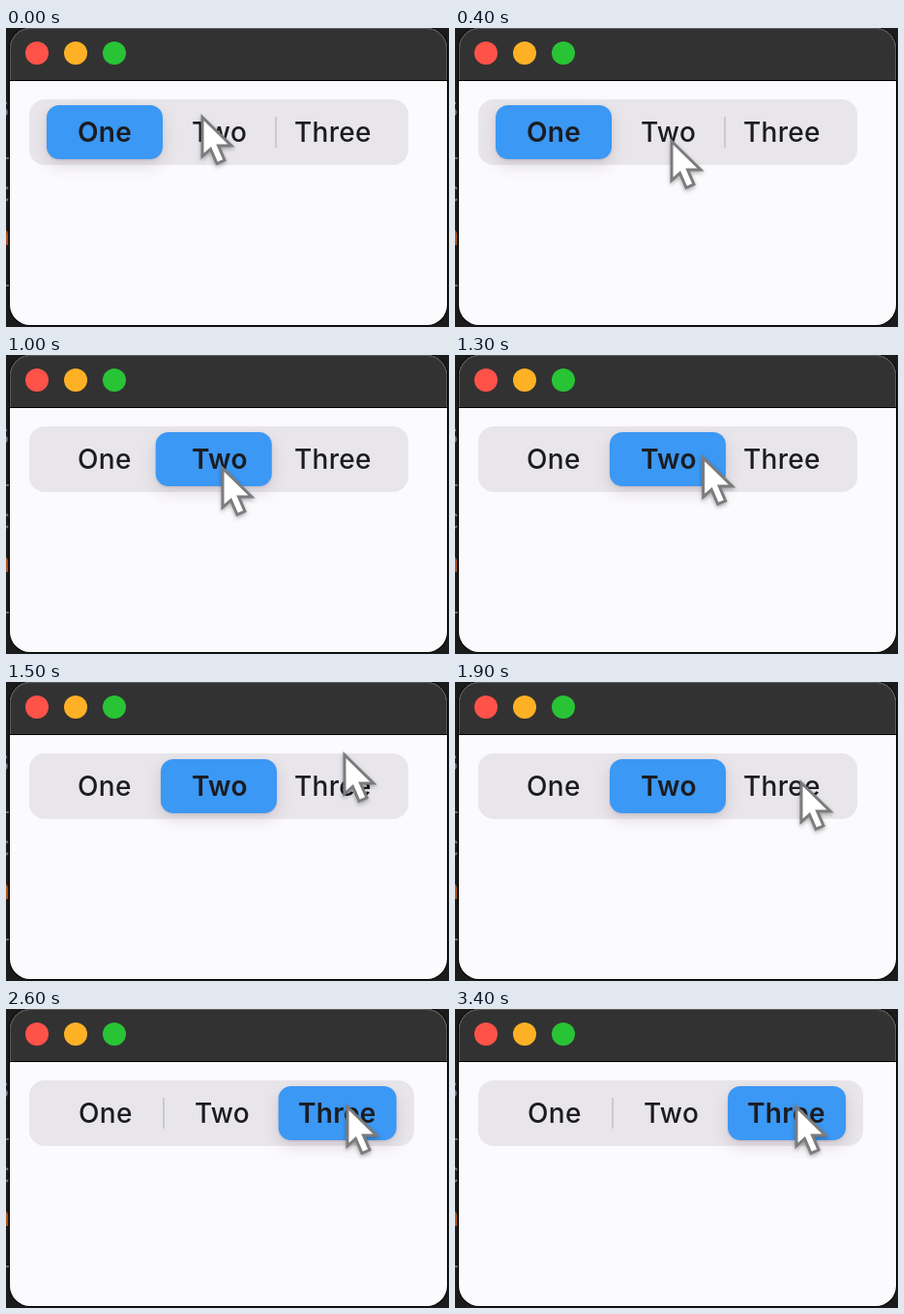
Animation of 458x310 px, one loop 3500 ms. Source, as an HTML page:

```html
<!DOCTYPE html>
<html lang="en">
<head>
<meta charset="utf-8">
<title>Segmented control</title>
<style>
  html, body { margin: 0; width: 100%; height: 100%; overflow: hidden; background: #1b1b1c; }
  svg { display: block; }
  text { font: 500 28px Inter, Roboto, sans-serif; letter-spacing: .3px; fill: #1c1c20; }
  text.on { font-weight: 600; }
  .behind text { font: 28px "DejaVu Sans Mono", monospace; text-anchor: end; fill: #77777b; }
  #pill { filter: drop-shadow(0 1px 1px rgba(40, 20, 40, .12)) drop-shadow(0 6px 8px rgba(70, 30, 60, .15)); }
  #cursor { filter: drop-shadow(0 2px 2px rgba(0, 0, 0, .3)); }
</style>
</head>
<body>
<svg width="458" height="310" viewBox="0 0 458 310">
  <defs><clipPath id="frame"><rect x="4" y="0" width="452" height="308" rx="21"/></clipPath></defs>
  <rect width="458" height="310" fill="#1b1b1c"/>
  <g class="behind">
    <text x="5" y="92" style="fill:#6c7784">s</text>
    <text x="5" y="180">c</text>
    <text x="5" y="225" style="fill:#a9531d">n</text>
    <path d="M0 135H3M0 267H3" stroke="#666a70" stroke-width="2"/>
  </g>
  <rect x="3" y="-1" width="454" height="310" rx="22" fill="#000"/>
  <g clip-path="url(#frame)">
    <rect width="458" height="310" fill="#fbfafd"/>
    <rect width="458" height="54" fill="#323232"/>
    <rect y="54" width="458" height="1" fill="#000"/>
  </g>
  <path d="M4.5 54V21.5A21 21 0 0 1 25.5 .5H434.5A21 21 0 0 1 455.5 21.5V54" fill="none" stroke="#5c5c5c"/>
  <circle cx="32" cy="26" r="12" fill="#ff5249"/>
  <circle cx="72" cy="26" r="12" fill="#ffb125"/>
  <circle cx="112" cy="26" r="12" fill="#28c435"/>

  <rect id="track" x="24" y="74" height="68" rx="16" fill="#e8e6eb"/>
  <rect id="lineA" x="162" y="92" width="2" height="32" fill="#cac9cd"/>
  <rect id="lineB" x="278" y="92" width="2" height="32" fill="#cac9cd"/>
  <rect id="pill" y="80" height="56" rx="13" fill="#3b98f4"/>
  <g id="labels">
    <text y="118">One</text>
    <text y="118">Two</text>
    <text y="118">Three</text>
  </g>
  <path id="cursor" d="M1 1.5V42L9.5 34.5L16 49.5L24 46L17.5 31H31Z"
        fill="#fff" stroke="#7c7c7c" stroke-width="3"/>
</svg>
<script>
const LOOP = 3500, STEP = 100, CLICK_TWO = 700, CLICK_THREE = 2100;
const $ = id => document.getElementById(id);
const labels = [...$("labels").children];
const lerp = (a, b, p) => a + (b - a) * p;

// Pointer stops: time, x, y
const path = [
  [0, 202, 91], [300, 223, 116], [1200, 223, 116], [1500, 349, 74],
  [1900, 357, 103], [2100, 357, 103], [2400, 352, 100], [LOOP, 352, 100]
];

// Critically damped spring from 0 to 1
function spring(ms) {
  const x = Math.max(0, ms) * 0.0163;
  return 1 - (1 + x) * Math.exp(-x);
}

function pointer(t) {
  const i = path.findIndex(k => k[0] > t);
  const [t0, x0, y0] = path[i - 1], [t1, x1, y1] = path[i];
  const u = (t - t0) / (t1 - t0), p = u * u * (3 - 2 * u);
  return [lerp(x0, x1, p), lerp(y0, y1, p)];
}

function draw(t) {
  const p = spring(t - CLICK_TWO), q = spring(t - CLICK_THREE);
  const chosen = t >= CLICK_THREE ? 2 : t >= CLICK_TWO ? 1 : 0;
  $("track").setAttribute("width", lerp(392, 398, q));
  $("pill").setAttribute("x", 42 + 118 * p + 122 * q);
  $("pill").setAttribute("width", lerp(120, 122, q));
  $("lineA").setAttribute("opacity", q);
  $("lineB").setAttribute("opacity", 1 - p);
  [[74, 75], [192, 195], [298, 302]].forEach(([a, b], i) => {
    labels[i].setAttribute("x", lerp(a, b, q));
    labels[i].classList.toggle("on", i === chosen);
  });
  $("cursor").setAttribute("transform", `translate(${pointer(t)})`);
}

const start = performance.now();
function tick() {
  const t = (performance.now() - start) % LOOP;
  draw(Math.floor(t / STEP) * STEP);
  requestAnimationFrame(tick);
}
tick();
</script>
</body>
</html>
```
